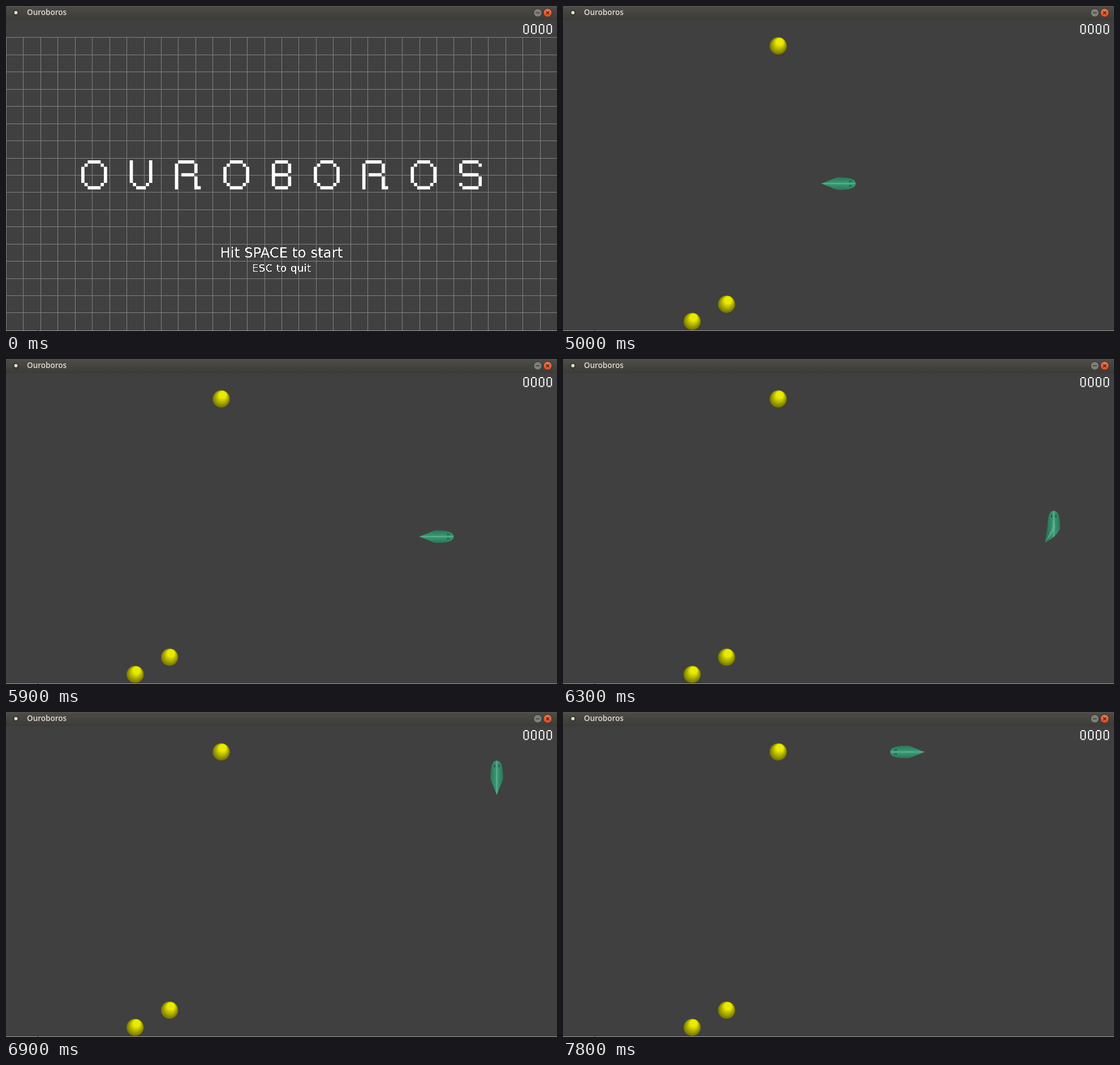
An HTML page for the animation above (8 s loop, 974 px wide and 575 px high).

```html
<!DOCTYPE html>
<html lang="en">
<head>
<meta charset="utf-8">
<title>Ouroboros</title>
<style>
html, body { margin: 0; width: 100%; height: 100%; overflow: hidden; background: #404040; }
svg { display: block; width: 974px; height: 575px; }
.bar { font: 600 13.5px "Open Sans", "Noto Sans", sans-serif; fill: #dfdbd2; }
.menu { font: 24px "DejaVu Sans", sans-serif; letter-spacing: .2px; fill: #fff; text-anchor: middle; }
.menu .small { font-size: 18.5px; }
.pixels { fill: none; stroke: #fff; stroke-width: 1; }
#grid { fill: none; stroke: #828282; stroke-width: 1; shape-rendering: crispEdges; }
.off { display: none; }
</style>
</head>
<body>
<svg viewBox="0 0 974 575">
  <defs>
    <linearGradient id="barFill" x2="0" y2="1">
      <stop stop-color="#56554f"/><stop offset=".12" stop-color="#4b4a45"/><stop offset="1" stop-color="#3c3b37"/>
    </linearGradient>
    <linearGradient id="closeFill" x2="0" y2="1">
      <stop stop-color="#f47a50"/><stop offset="1" stop-color="#e0481c"/>
    </linearGradient>
    <linearGradient id="skin" gradientUnits="userSpaceOnUse" x1="0" x2="0" y1="-11.3" y2="11.3">
      <stop stop-color="#2a7556"/><stop offset=".28" stop-color="#338b67"/><stop offset=".44" stop-color="#3a9771"/>
      <stop offset=".5" stop-color="#62b595"/><stop offset=".56" stop-color="#3a9771"/>
      <stop offset=".72" stop-color="#338b67"/><stop offset="1" stop-color="#2a7556"/>
    </linearGradient>
    <filter id="hardEdge">
      <feComponentTransfer><feFuncA type="discrete" tableValues="0 1"/></feComponentTransfer>
    </filter>
    <g id="food"></g>
  </defs>

  <rect width="974" height="575" fill="#404040"/>
  <path id="grid"/>

  <g id="start">
    <g id="logo" class="pixels" role="img" aria-label="OUROBOROS"></g>
    <g class="menu" filter="url(#hardEdge)">
      <text x="487" y="445">Hit SPACE to start</text>
      <text class="small" x="487" y="469.5">ESC to quit</text>
    </g>
  </g>

  <g id="levels" class="menu" filter="url(#hardEdge)">
    <text x="487" y="116">Select difficulty level</text>
    <text x="487" y="198">(1) Easy - More food, grid lines</text>
    <text x="487" y="253">(2) Medium - Less food, grid lines</text>
    <text x="487" y="308">(3) Hard - Even less food, no grid lines</text>
    <text x="487" y="418">Use WASD or the arrow keys to control the snake.</text>
  </g>

  <g id="game">
    <use href="#food" x="380.5" y="70.5"/>
    <use href="#food" x="289.2" y="527.5"/>
    <use href="#food" x="228.3" y="558"/>
    <g id="snake">
      <path id="body" fill="url(#skin)"/>
      <path id="shine" fill="#62b595" opacity=".65"/>
      <path d="M19 -4.5l2 1.5M22 -4h1.5M19 4.5l2 -1.5M22 4h1.5" stroke="#123c2b" stroke-width="1.5"/>
    </g>
  </g>

  <g id="score" class="pixels" role="img" aria-label="0000"></g>

  <rect width="974" height="25" fill="url(#barFill)"/>
  <circle cx="17.5" cy="12" r="5.2" fill="#35342f"/>
  <circle cx="17.5" cy="11.7" r="3" fill="#dcdcd4"/>
  <text class="bar" x="37" y="16">Ouroboros</text>
  <circle cx="940" cy="12" r="7.3" fill="#807f78" stroke="#33322e"/>
  <path d="M936.5 12h7" stroke="#3a3934" stroke-width="1.4"/>
  <circle cx="957.5" cy="12" r="7.5" fill="url(#closeFill)" stroke="#33322e"/>
  <path d="M954.9 9.4l5.2 5.2m0-5.2l-5.2 5.2" stroke="#47200f" stroke-width="1.4"/>
  <path d="M0 574.5h974" stroke="#a0a0a0"/>
  <path d="M55 574.5h2" stroke="#404040"/>
</svg>

<script>
const CELL = 30.44, TOP = 55.45, COLS = 32, ROWS = 17, LOOP = 8000;
const el = id => document.getElementById(id);
const range = n => [...Array(n).keys()];

el('grid').setAttribute('d',
  range(COLS).map(i => `M${Math.round(i * CELL) + .5} 55V574`).join('') +
  range(ROWS).map(i => `M0 ${Math.round(TOP + i * CELL) + .5}H974`).join(''));

// Blocky letters: width in units and strokes one unit thick.
const letters = {
  O: [8, 'M2 .5h4M2 8.5h4M.5 2v5M7.5 2v5M1 1.5h1M6 1.5h1M1 7.5h1M6 7.5h1'],
  U: [7, 'M.5 0v7M6.5 0v7M1 7.5h1M5 7.5h1M2 8.5h3'],
  R: [8, 'M.5 1v8M1 .5h5M6.5 1v3M2 4.5h4M6.5 5v3M6 8.5h2'],
  B: [6, 'M.5 1v7M1 .5h4M5.5 1v3M1 4.5h4M5.5 5v3M1 8.5h4'],
  S: [7, 'M1 .5h5M.5 1v3M6 1.5h1M1 4.5h5M6.5 5v3M0 7.5h1M1 8.5h5'],
  0: [5, 'M1 .5h3M1 8.5h3M.5 1v7M4.5 1v7']
};

function blockText(group, word, x, y, unit, gap) {
  let pen = 0;
  group.setAttribute('transform', `translate(${x} ${y}) scale(${unit})`);
  group.innerHTML = [...word].map(ch => {
    const [width, d] = letters[ch];
    const path = `<path d="${d}" transform="translate(${pen})"/>`;
    pen += width + gap;
    return path;
  }).join('');
}
blockText(el('logo'), 'OUROBOROS', 133, 273, 5.71, 7);
blockText(el('score'), '0000', 914.5, 32, 1.95, 2);

el('food').innerHTML = range(8).map(i => {
  const tone = 122 + i * 16;
  return `<circle cx="${i * .35}" cy="${-i}" r="${15.2 - i * 1.2}" fill="rgb(${tone},${tone},0)"/>`;
}).join('');

// The snake faces right; its origin lies between head and tail.
const HEAD = 'Q12 11 20 9.5Q30.4 7 30.4 0Q30.4 -7 20 -9.5Q12 -11 ';
const straight = {
  body: `M-30.4 0L-14 6.5Q-5 11.2 1 11.2${HEAD}1 -11.2Q-5 -11.2 -14 -6.5Z`,
  shine: 'M-29 0L0 -1L24 0L0 1Z'
};
const bent = {
  body: `M-26 -15.5Q-16 4 -2 11.2L1 11.2${HEAD}1 -11.2Z`,
  shine: 'M-25 -15L0 -2.5L24 0L0 2.5Q-10 -2 -25 -15Z'
};

function snakePose(step) {
  const row = r => TOP + r * CELL;
  if (step <= 12) return { x: (16 + step) * CELL, y: row(8.5), turn: 0, shape: straight };
  if (step <= 20) return { x: 28.5 * CELL, y: row(21 - step), turn: -90, shape: step === 13 ? bent : straight };
  return { x: (48 - step) * CELL, y: row(.5), turn: 180, shape: straight };
}

function show(id, on) { el(id).classList.toggle('off', !on); }

function draw(t) {
  const playing = t >= 5000;
  show('start', t < 1300);
  show('levels', t >= 1300 && !playing);
  show('grid', !playing);
  show('game', playing);
  if (!playing) return;
  let step = Math.min(28, Math.floor((t - 5000) / 100));
  if (step === 26) step = 25; // brief stall before the last moves
  const { x, y, turn, shape } = snakePose(step);
  el('snake').setAttribute('transform', `translate(${x} ${y}) rotate(${turn})`);
  el('body').setAttribute('d', shape.body);
  el('shine').setAttribute('d', shape.shine);
}

const began = performance.now();
function tick() {
  draw((performance.now() - began) % LOOP);
  requestAnimationFrame(tick);
}
tick();
</script>
</body>
</html>
```
